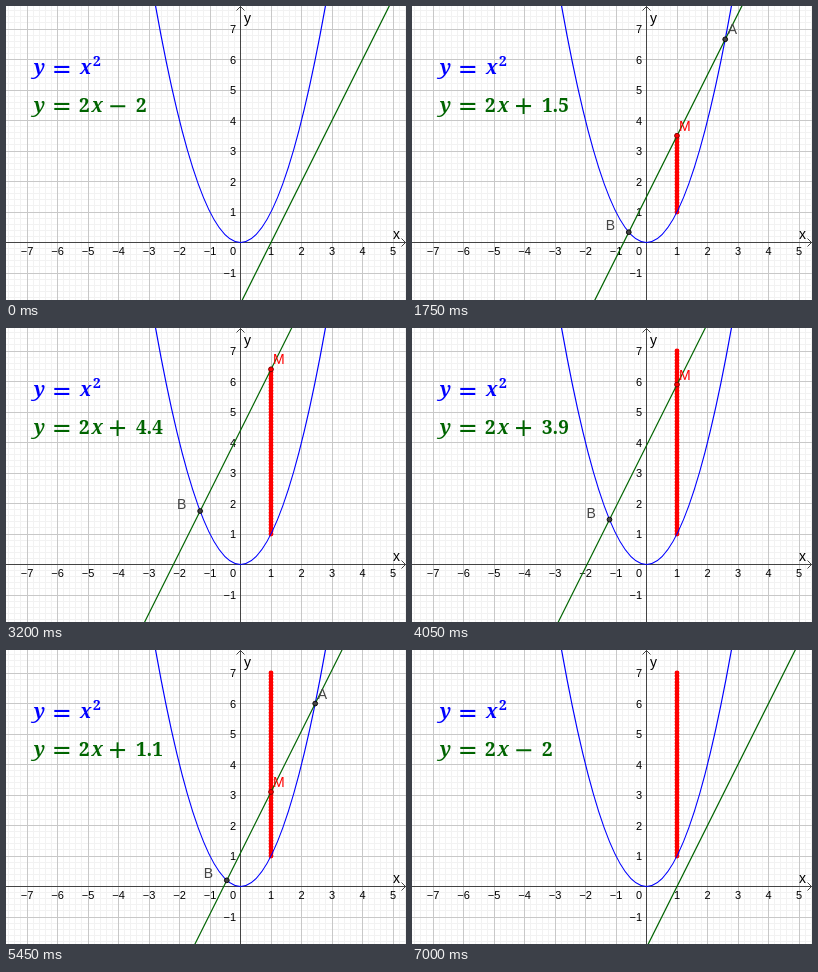
Animation of 400x294 px, one loop 7050 ms. Source, as an HTML page:

```html
<!DOCTYPE html>
<html lang="en">
<head>
<meta charset="utf-8">
<title>Parabola and moving line</title>
<style>
  html, body { margin: 0; width: 100%; height: 100%; overflow: hidden; background: #fff; }
  svg { display: block; width: 400px; height: 294px; }
  text { font-family: "Liberation Sans", Arial, sans-serif; font-size: 14px; }
  .num { font-size: 11px; }
  .formula text { font: bold 19px "Noto Serif", serif; }
  .formula .var { font-style: italic; }
  .formula .op { font: 24px "DejaVu Sans", sans-serif; }
  .formula .sup { font-size: 14px; }
</style>
</head>
<body>
<svg id="stage" viewBox="0 0 400 294"></svg>
<script>
const UNIT = 30.5, X0 = 234.5, Y0 = 236.5;
const STEP = 50, FRAMES = 141;
const BLUE = "#0000ff", GREEN = "#006400", RED = "#ff0000", DARK = "#444";
const stage = document.getElementById("stage");
const px = x => X0 + x * UNIT;
const py = y => Y0 - y * UNIT;

function add(tag, attrs, parent = stage, content = "") {
  const el = document.createElementNS("http://www.w3.org/2000/svg", tag);
  set(el, attrs);
  el.textContent = content;
  return parent.appendChild(el);
}
function set(el, attrs) {
  for (const key in attrs) el.setAttribute(key, attrs[key]);
}
const label = (content, x, y, attrs = {}, parent = stage) =>
  add("text", { x, y, ...attrs }, parent, content);
const show = (el, on) => set(el, { visibility: on ? "visible" : "hidden" });
const signed = n => String(n).replace("-", "−");

function gridPath(step) {
  let d = "";
  for (let i = Math.ceil(-X0 / step); X0 + i * step < 400; i++) d += `M${X0 + i * step} 0V294`;
  for (let i = Math.ceil(-Y0 / step); Y0 + i * step < 294; i++) d += `M0 ${Y0 + i * step}H400`;
  return d;
}

function drawBackground() {
  const crisp = { fill: "none", "shape-rendering": "crispEdges" };
  add("path", { d: gridPath(UNIT / 5), stroke: "#f2f2f2", ...crisp });
  add("path", { d: gridPath(UNIT), stroke: "#c8c8c8", ...crisp });
  add("path", { d: `M0 ${Y0}H400M${X0} 0V294`, stroke: "#444", ...crisp });
  add("path", {
    d: `M395.5 ${Y0 - 4}L399.5 ${Y0}L395.5 ${Y0 + 4}M${X0 - 4} 4.5L${X0} .5L${X0 + 4} 4.5`,
    stroke: "#444", fill: "none"
  });
  for (let n = -7; n <= 5; n++) {
    if (n) label(signed(n), px(n), 249, { class: "num", "text-anchor": "middle" });
  }
  for (let n = -1; n <= 7; n++) {
    label(signed(n), 230, n ? py(n) + 4 : 249, { class: "num", "text-anchor": "end" });
  }
  label("x", 387, 233);
  label("y", 238, 17);
}

function drawFormula(y, fill) {
  const group = add("g", { class: "formula", fill });
  label("y", 28, y, { class: "var" }, group);
  label("=", 45.7, y + 2.5, { class: "op" }, group);
  return group;
}

function makePoint(name, fill, stroke, color, dx, dy) {
  const dot = add("circle", { r: 2.4, fill, stroke, "stroke-width": 0.9 });
  const tag = label(name, 0, 0, { fill: color });
  return (x, y, on) => {
    set(dot, { cx: px(x), cy: py(y) });
    set(tag, { x: px(x) + dx, y: py(y) + dy });
    show(dot, on);
    show(tag, on);
  };
}

drawBackground();

// Zero-length round dashes leave one dot per 0.1 unit travelled.
const trace = add("path", {
  stroke: RED, fill: "none", "stroke-width": 4.9,
  "stroke-linecap": "round", "stroke-dasharray": `0 ${UNIT / 10}`
});
add("path", {
  d: `M${px(-3)} ${py(9)}Q${px(0)} ${py(-9)} ${px(3)} ${py(9)}`,
  stroke: BLUE, fill: "none", "stroke-width": 1.2
});
const line = add("line", { stroke: GREEN, "stroke-width": 1.2 });

const square = drawFormula(68, BLUE);
label("x", 74, 68, { class: "var" }, square);
label("2", 87, 60, { class: "sup" }, square);

const linear = drawFormula(105.5, GREEN);
label("2", 73, 105.5, {}, linear);
label("x", 85.5, 105.5, { class: "var" }, linear);
const sign = label("", 101.5, 108, { class: "op" }, linear);
const offset = label("", 130, 105.5, {}, linear);

const placeA = makePoint("A", DARK, "#000", DARK, 2.5, -5);
const placeB = makePoint("B", DARK, "#000", DARK, -23, -2);
const placeM = makePoint("M", RED, "#700", RED, 2, -5);

function render(time) {
  const frame = Math.floor((time % (STEP * FRAMES)) / STEP);
  const rise = Math.min(frame, FRAMES - 1 - frame);
  const b = (rise - 20) / 10;
  const meets = rise >= 10;
  const root = Math.sqrt(Math.max(0, (rise - 10) / 10));

  set(line, { x1: px(-5), y1: py(b - 10), x2: px(6), y2: py(b + 12) });
  sign.textContent = b < 0 ? "−" : b > 0 ? "+" : "";
  offset.textContent = b ? Math.abs(b) : "";

  const peak = 2 + (Math.min(frame, 70) - 20) / 10;
  set(trace, { d: `M${px(1)} ${py(1)}V${py(peak) - 0.3}` });
  show(trace, frame >= 10);

  placeA(1 + root, (1 + root) ** 2, meets);
  placeB(1 - root, (1 - root) ** 2, meets);
  placeM(1, 2 + b, meets);
}

const start = performance.now();
function tick() {
  render(performance.now() - start);
  requestAnimationFrame(tick);
}
tick();
</script>
</body>
</html>
```
